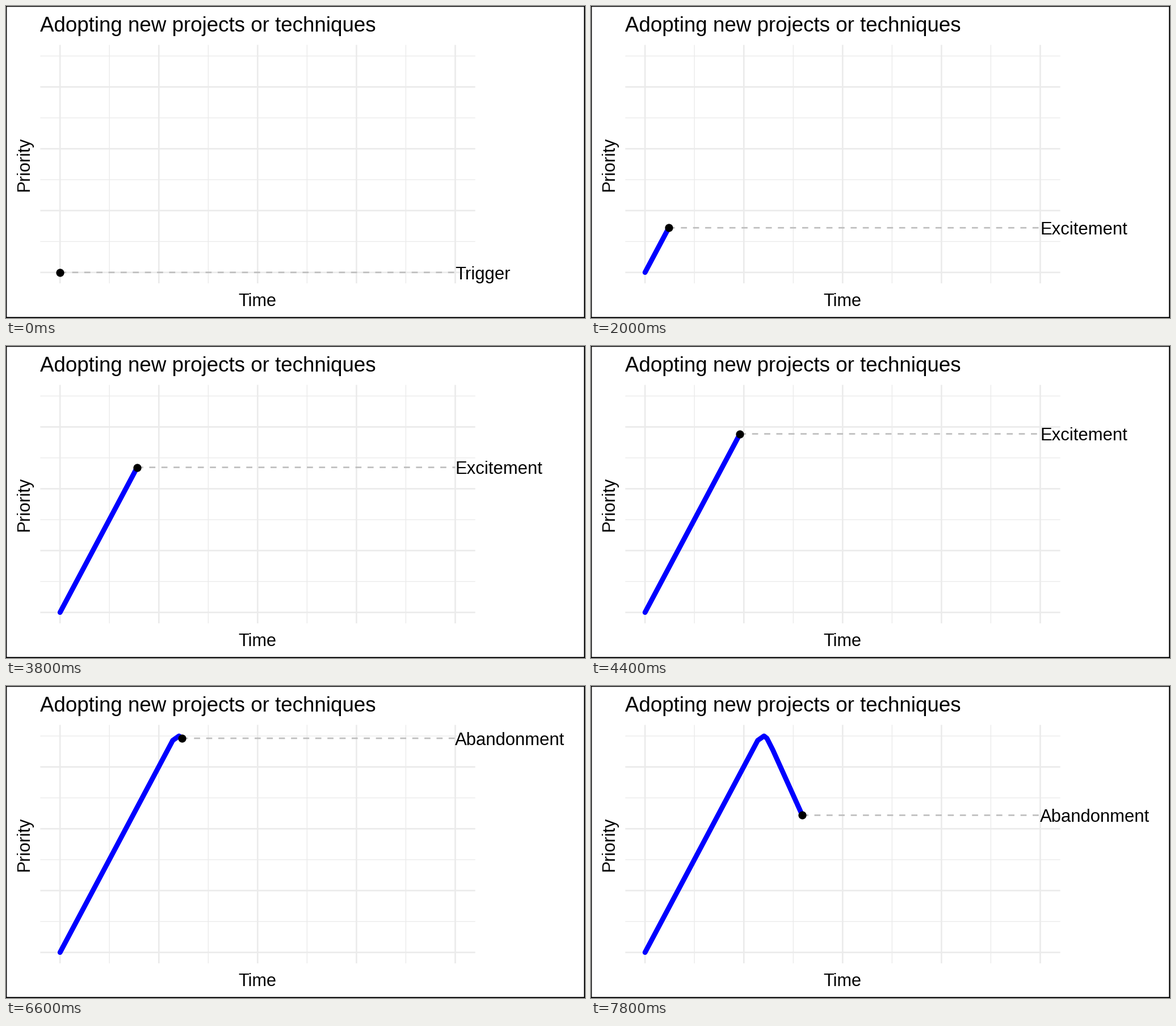
These frames come from a looping animation (1020 by 549 pixels, 8000 ms). A matplotlib script:

```python
import matplotlib.pyplot as plt
from matplotlib.animation import FuncAnimation
from matplotlib.patches import Rectangle

W, H, DPI = 1020, 549, 100
PX = 72 / DPI  # points per pixel

plt.rcParams["font.family"] = "Liberation Sans"

LEFT, RIGHT, TOP, BOTTOM = 60.4, 826.6, 68.5, 488
X0, Y0 = 95.2, 468.8
DX, DY = 174.05, 108.8
X_END = X0 + 4 * DX

RISE_STEPS = 20
START_HOLD, PEAK_HOLD = 6, 6
PEAK = (304.8, 88)

# The small margin keeps the pixel size from being rounded down.
fig = plt.figure(figsize=((W + 0.01) / DPI, (H + 0.01) / DPI), dpi=DPI,
                 facecolor="white")
ax = fig.add_axes([0, 0, 1, 1])
ax.set_xlim(0, W)
ax.set_ylim(H, 0)
ax.axis("off")


def line(xs, ys, color, width, **kw):
    return ax.plot(xs, ys, color=color, lw=width * PX, snap=False, **kw)[0]


def text(x, y, s, size, **kw):
    return ax.text(x, y, s, fontsize=size * PX, color="black",
                   va="baseline", rotation_mode="anchor", **kw)


def grid_line(xs, ys, minor):
    line(xs, ys, "#ebebeb", 1.35 if minor else 2.67,
         zorder=1 if minor else 2, solid_capstyle="butt")


def draw_grid():
    for half in range(9):
        x = X0 + half * DX / 2
        grid_line([x, x], [TOP, BOTTOM], half % 2)
    for half in range(8):
        y = Y0 - half * DY / 2
        grid_line([LEFT, RIGHT], [y, y], half % 2)


def position(step):
    """Point on the curve after a number of steps."""
    if step < RISE_STEPS:
        dx = 10.45 * step
        return X0 + dx, Y0 - 1.879 * dx
    if step == RISE_STEPS:
        return PEAK
    x = 309.9 + 10.38 * (step - RISE_STEPS - 1)
    return x, max(92, 135.5 + 2.215 * (x - 330.7))


def stage_name(step):
    if step == 0:
        return "Trigger"
    if step < RISE_STEPS:
        return "Excitement"
    return "Overestimate" if step == RISE_STEPS else "Abandonment"


draw_grid()
ax.add_patch(Rectangle((0, 0), W - 0.4, H - 0.4, fill=False, ec="black",
                       lw=2.8 * PX, snap=False, zorder=9))
text(60.4, 45, "Adopting new projects or techniques", 36.7, ha="left")
text(443.3, 528, "Time", 30.7, ha="center")
text(40, 278.5, "Priority", 30.7, ha="center", rotation=90)

guide = line([], [], "#bebebe", 2.67, zorder=3, dash_capstyle="butt",
             linestyle=(0, (4, 4)))
curve = line([], [], "#0000ff", 8.8, zorder=4, solid_capstyle="round",
             solid_joinstyle="round")
dot = line([], [], "black", 0, zorder=5, marker="o", ms=14.2 * PX, mew=0)
label = text(X_END, Y0, "", 31, ha="left", zorder=6)


def update(frame):
    rise = min(max(frame - START_HOLD, 0), RISE_STEPS)
    fall = max(frame - START_HOLD - RISE_STEPS - PEAK_HOLD, 0)
    step = rise + fall
    path = [position(k) for k in range(step + 1)]
    x, y = path[-1]
    guide.set_data([x, X_END], [y, y])
    curve.set_data(*zip(*path) if step else ([], []))
    dot.set_data([x], [y])
    label.set_position((X_END, y + 11.7))
    label.set_text(stage_name(step))
    return guide, curve, dot, label


anim = FuncAnimation(fig, update, frames=40, interval=200,
                     repeat=True, repeat_delay=0, blit=False)
plt.show()
```
